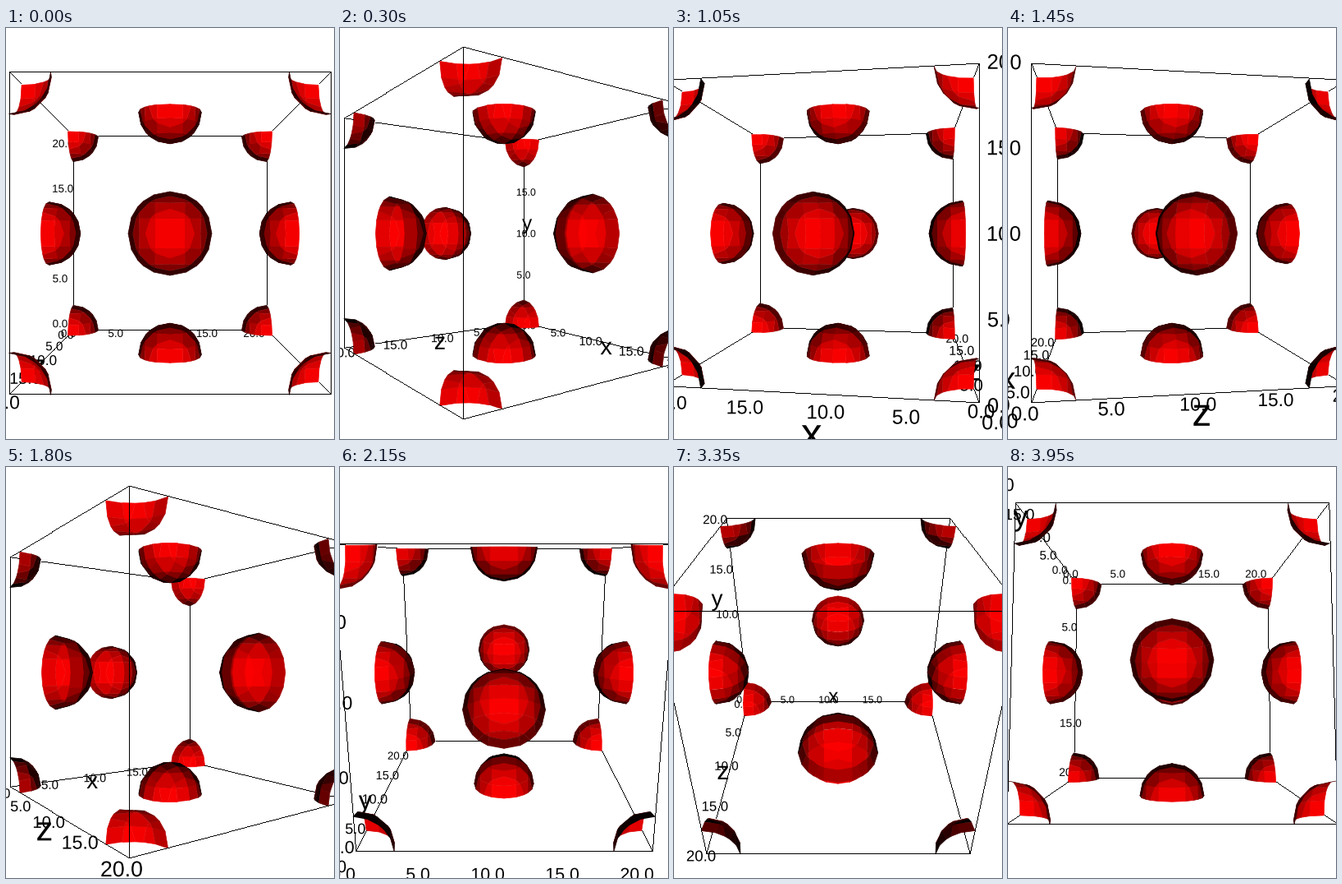
Animation of 400 by 500 pixels, one loop 4000 ms. Source, as a matplotlib script:

```python
from itertools import product

import matplotlib.pyplot as plt
import numpy as np
from matplotlib.animation import FuncAnimation
from matplotlib.collections import PathCollection
from matplotlib.path import Path
from matplotlib.textpath import TextPath

W, H = 400, 500
FRAMES, HALF = 80, 40
FOCAL, DIST = 591, 4.008      # pixels, box half-sides
RADIUS = 2.595                # grid cells; the box is 20 cells wide
LABEL, TITLE = 69, 140        # text size in pixels at unit distance


def octant_facets():
    """Facets of one eighth of a sphere cut by the unit grid."""
    facets = []
    for cell in product(range(3), repeat=3):
        pts = []
        for axis in range(3):
            i, j = [m for m in range(3) if m != axis]
            for du, dv in product((0, 1), repeat=2):
                u, v = cell[i] + du, cell[j] + dv
                rest = RADIUS ** 2 - u * u - v * v
                if rest > 0 and cell[axis] <= rest ** 0.5 < cell[axis] + 1:
                    p = np.zeros(3)
                    p[i], p[j], p[axis] = u, v, rest ** 0.5
                    pts.append(p)
        if len(pts) < 3:
            continue
        pts = np.array(pts)
        mid = pts.mean(axis=0)
        e1 = np.cross(mid, (1, -1, 0))
        e2 = np.cross(mid, e1)
        e1, e2 = e1 / np.linalg.norm(e1), e2 / np.linalg.norm(e2)
        rel = pts - mid
        facets.append(pts[np.argsort(np.arctan2(rel @ e2, rel @ e1))] / 10)
    return facets


def facet_normal(poly):
    n = np.cross(poly, np.roll(poly, -1, axis=0)).sum(axis=0)
    return n / np.linalg.norm(n)


# Face-centred cubic sites, each clipped to the box
corners = [np.array(c, float) for c in product((-1, 1), repeat=3)]
faces = [s * row for row in np.eye(3) for s in (-1, 1)]
sites = corners + faces
edges = [(a, b) for a, b in product(corners, repeat=2)
         if (b - a).sum() == 2 and np.count_nonzero(b - a) == 1]

polys, normals = [], []
octant = [(p, facet_normal(p)) for p in octant_facets()]
for site in sites:
    for sign in product((-1, 1), repeat=3):
        if np.any(site * sign > 0):
            continue
        for poly, n in octant:
            polys.append(site + poly * sign)
            normals.append(n * sign)
normals = np.array(normals)
verts = np.concatenate(polys)
cuts = np.cumsum([len(p) for p in polys])[:-1]
mids = np.array([p.mean(axis=0) for p in polys])


def glyphs(text):
    path = TextPath((0, 0), text, size=1, prop={"family": "Liberation Sans"})
    box = path.get_extents()
    centre = ((box.x0 + box.x1) / 2, (box.y0 + box.y1) / 2)
    return Path((path.vertices - centre) * (1, -1), path.codes), box.width


# (glyph path, size, position, axis, half the width missing to a full label)
texts = []
full = glyphs("20.0")[1]
half = full * LABEL / FOCAL / 2
for value in range(0, 21, 5):
    path, width = glyphs(f"{value:.1f}")
    t = value / 10 - 1
    for axis, pos in (("x", (t - half, -1.055, -1.132)),
                      ("y", (-1.137, 0.955 * t, -1.145)),
                      ("z", (-1.045, -1.045, t))):
        texts.append((path, LABEL, pos, axis, (full - width) / 2))
for name, pos in (("x", (-0.055, -1.136, -1.295)),
                  ("y", (-1.255, 0.085, -1.25)),
                  ("z", (-1.085, -1.1, 0.01))):
    texts.append((glyphs(name)[0], TITLE, pos, None, 0))


def camera(i):
    """Rows: screen right, screen up, direction towards the viewer."""
    if i < HALF:
        a = np.radians(9 * i)
        c, s = np.cos(a), np.sin(a)
        return np.array([(c, 0, -s), (0, 1, 0), (s, 0, c)])
    a = np.radians(4.5 * (i - HALF))
    c, s = np.cos(a), np.sin(a)
    return np.array([(1, 0, 0), (0, s, c), (0, -c, s)])


def project(points, cam):
    right, up, depth = (points @ cam.T).T
    scale = FOCAL / (DIST - depth)
    return np.column_stack((W / 2 + scale * right, H / 2 - scale * up))


def visible(points, eye):
    """True where no sphere part stands between the eye and the point."""
    ray = points - eye
    a = (ray ** 2).sum(axis=1)
    seen = np.ones(len(points), bool)
    for site in sites:
        off = eye - site
        b = ray @ off
        disc = b * b - a * (off @ off - (RADIUS / 10 - 0.003) ** 2)
        root = np.sqrt(np.maximum(disc, 0))
        for t in ((-b - root) / a, (-b + root) / a):
            hit = eye + t[:, None] * ray
            inside = np.all(np.abs(hit) <= 1 + 1e-6, axis=1)
            seen &= ~((disc > 0) & (t < 0.999) & inside)
    return seen


def edge_points(a, b, cam):
    """Points of an edge, one for each pixel along its longer screen side."""
    ends = project(np.array([a, b]), cam)
    n = int(np.abs(ends[1] - ends[0]).max()) + 1
    u = np.linspace(0, 1, n + 1)
    near_a, near_b = 1 / (DIST - a @ cam[2]), 1 / (DIST - b @ cam[2])
    t = u * near_b / (near_a * (1 - u) + near_b * u)
    return a + t[:, None] * (b - a)


fig = plt.figure(figsize=(W / 100, H / 100), dpi=100, facecolor="white")
ax = fig.add_axes([0, 0, 1, 1])
ax.set(xlim=(0, W), ylim=(H, 0))
ax.axis("off")
solids = PathCollection([])
ax.add_collection(solids, autolim=False)
frame_dots, = ax.plot([], [], ",", color="black", zorder=3)


def draw(i):
    cam = camera(i)
    view = cam[2]

    shapes = [Path(p) for p in np.split(project(verts, cam), cuts)]
    colors = np.zeros((len(shapes) + len(texts), 4))
    colors[:, 3] = 1
    colors[:len(shapes), 0] = np.abs(normals @ view)
    depths = list(mids @ view)
    widths = [0.5] * len(shapes) + [0] * len(texts)

    for path, size, pos, axis, slack in texts:
        pos = np.array(pos)
        if axis == "z":
            pos = pos + 0.06 * cam[1, 2] ** 2 * cam[1]
        lean = cam[0, 0] if axis == "x" else -1
        depth = pos @ view
        xy = project(pos[None], cam)[0]
        glyph = (path.vertices + (lean * slack, 0)) * size / (DIST - depth)
        shapes.append(Path(glyph + xy, path.codes))
        depths.append(depth)

    order = np.argsort(depths)
    solids.set_paths([shapes[k] for k in order])
    solids.set_facecolor(colors[order])
    solids.set_edgecolor(colors[order])
    solids.set_linewidth([widths[k] for k in order])

    pts = np.concatenate([edge_points(a, b, cam) for a, b in edges])
    xy = project(pts[visible(pts, DIST * view)], cam)
    frame_dots.set_data(xy[:, 0], xy[:, 1])
    return [solids, frame_dots]


anim = FuncAnimation(fig, draw, frames=FRAMES, interval=50,
                     repeat=True, repeat_delay=0, blit=False)
plt.show()
```
